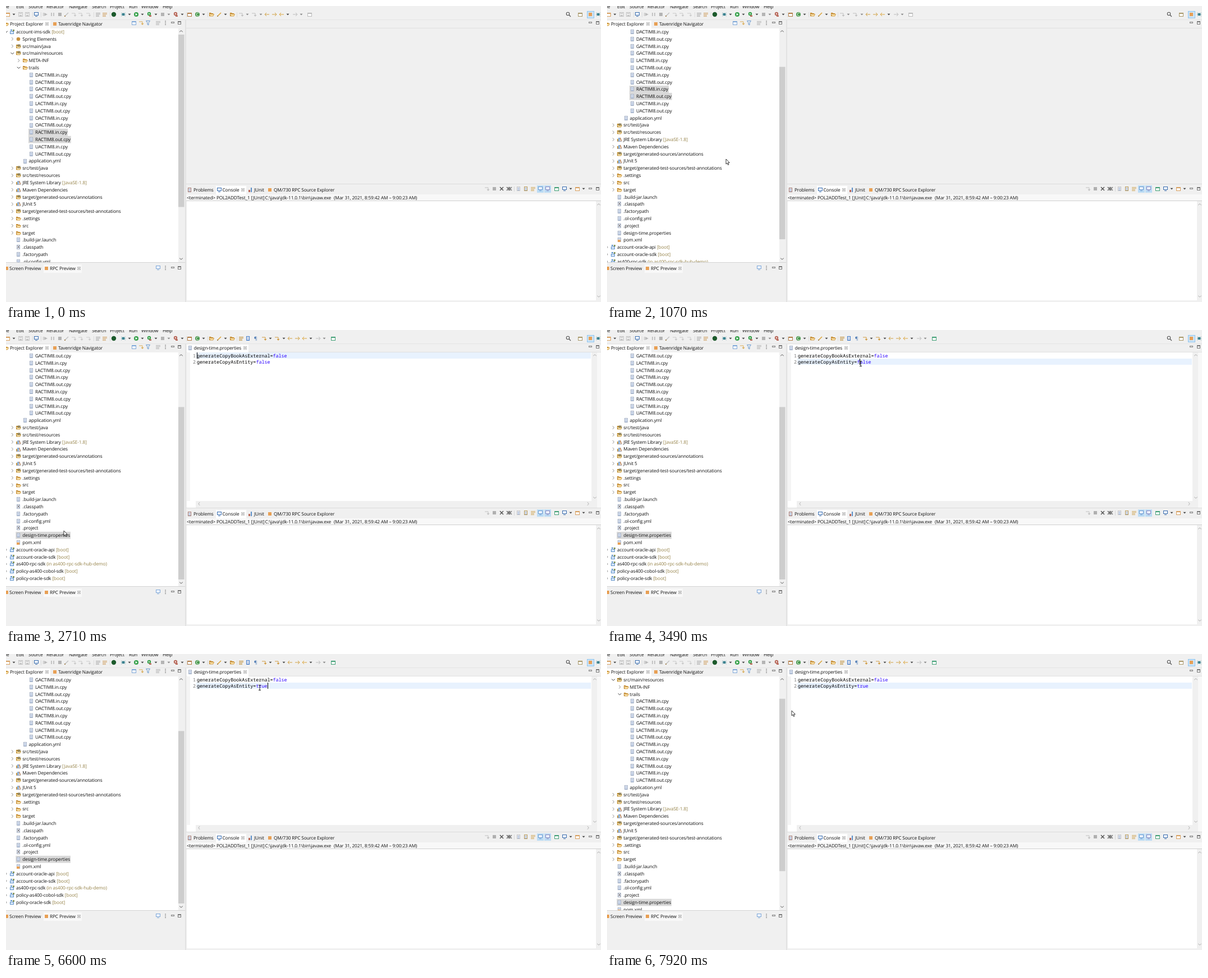
An HTML page with a canvas that plays this animation: 1060x528 px, repeating every 8 s.

```html
<!DOCTYPE html>
<html lang="en">
<head>
<meta charset="utf-8">
<title>IDE screencast</title>
<style>
html, body { margin: 0; width: 100%; height: 100%; overflow: hidden; background: #f0f0f0 }
canvas { display: block }
</style>
</head>
<body>
<canvas width="1060" height="528"></canvas>
<script>
const g = document.querySelector('canvas').getContext('2d');
const UI = '8.25px "Open Sans", "Noto Sans", sans-serif';
const MONO = '8.37px "Noto Sans Mono", "DejaVu Sans Mono", monospace';
const LOOP = 8000, ROW = 12.81, CHAR = 5.02;
const ORANGE = '#e8a055', BLUE = '#5b8fc8';
g.textRendering = 'geometricPrecision';

// ---- drawing helpers ----
function rect(x, y, w, h, c) { g.fillStyle = c; g.fillRect(x, y, w, h); }

function frame(x, y, w, h, c) {
  g.strokeStyle = c; g.lineWidth = 1;
  g.strokeRect(x + .5, y + .5, w - 1, h - 1);
}

function line(c, width, ...p) {
  g.strokeStyle = c; g.lineWidth = width;
  g.beginPath();
  for (let i = 0; i < p.length; i += 2) g.lineTo(p[i], p[i + 1]);
  g.stroke();
}

function poly(c, ...p) {
  g.fillStyle = c;
  g.beginPath();
  for (let i = 0; i < p.length; i += 2) g.lineTo(p[i], p[i + 1]);
  g.fill();
}

function dot(x, y, r, c) {
  g.fillStyle = c;
  g.beginPath(); g.arc(x, y, r, 0, 7); g.fill();
}

function setFont(font) {
  g.font = font;
  g.letterSpacing = font === UI ? '-0.12px' : '0px';
}

// y is the middle of the capitals; returns the right end
function text(s, x, y, c = '#111', font = UI) {
  setFont(font);
  g.fillStyle = c;
  g.fillText(s, x, y + 2.9);
  return x + g.measureText(s).width;
}

function chevron(x, y, dx, dy, c = '#606060') {
  line(c, 1, x - dx - dy * 2.4, y - dy - dx * 2.4, x + dx, y + dy, x - dx + dy * 2.4, y - dy + dx * 2.4);
}

// ---- icons, centred on x, y ----
const icons = {
  s(x, y, c) { rect(x - 3, y - 3, 6, 6, c); },
  o(x, y, c) { rect(x - 4, y - 3, 8, 7, '#fcfcfc'); frame(x - 4, y - 3, 8, 7, c); rect(x - 4, y - 3, 8, 2, c); },
  t(x, y, c) { rect(x - 4, y - 4, 8, 6, '#eef4ff'); frame(x - 4, y - 4, 8, 6, c); rect(x - 2, y + 3, 4, 1, c); },
  w(x, y, c) { frame(x - 4, y - 4, 8, 8, c); frame(x - 2, y - 4, 4, 3, c); rect(x - 2, y + 1, 4, 2, c); },
  d(x, y, c) {
    rect(x - 3, y - 4, 6, 8, '#fbfbff'); frame(x - 3, y - 4, 6, 8, c);
    for (let i = 0; i < 3; i++) rect(x - 1.5, y - 2 + 2 * i, 3, .8, '#6f8fc0');
  },
  f(x, y, c) {
    rect(x - 4, y - 3, 3.5, 2, c); frame(x - 4, y - 2, 7, 5, c);
    poly('#fbe3a8', x - 3, y + 3, x - 1.5, y - .5, x + 4.5, y - .5, x + 3, y + 3);
    line(c, .8, x - 3.5, y + 3, x - 1.5, y - .5, x + 4.5, y - .5, x + 3, y + 3, x - 3.5, y + 3);
  },
  g(x, y, c) { icons.f(x, y, '#b98a2c'); rect(x - 1, y - 3.5, 4.5, 4, c); line('#fff', .6, x + 1.2, y - 3.5, x + 1.2, y + .5); },
  j(x, y, c) { rect(x - 4, y - 1, 7, 5, '#dbe9fa'); frame(x - 4, y - 1, 7, 5, c); rect(x - 3, y - 4, 3, 2, c); rect(x + 1, y - 4, 3, 3, '#8a9a62'); },
  y(x, y) {
    rect(x - 4, y - 1, 2, 4, '#c89a48'); rect(x - 1.5, y - 3, 2, 6, BLUE);
    line('#b07a50', 1.5, x + 1.5, y - 3, x + 3.5, y + 3); rect(x - 4, y + 3, 8, .8, '#8a8a9a');
  },
  c(x, y, c) { dot(x, y, 4, c); poly('#fff', x - 1.3, y - 2.2, x + 2.3, y, x - 1.3, y + 2.2); },
  e(x, y, c) { dot(x, y - 1, 3.2, c); poly('#fff', x - 1, y - 2.5, x + 1.6, y - 1, x - 1, y + .6); rect(x, y + 1.5, 4, 2.5, '#b8685a'); },
  b(x, y, c) { dot(x, y, 2.4, c); line(c, .7, x - 3.5, y - 3, x + 3.5, y + 3); line(c, .7, x - 3.5, y + 3, x + 3.5, y - 3); line(c, .7, x - 4, y, x + 4, y); },
  h(x, y, c) { dot(x, y, 4.2, c); },
  q(x, y, c) { rect(x - 3, y - 3, 6, 6, c); },
  a(x, y, c) { line(c, 1, x + 4, y, x - 3, y); line(c, 1, x - 1, y - 3, x - 4, y, x - 1, y + 3); },
  r(x, y, c) { line(c, 1, x - 4, y, x + 3, y); line(c, 1, x + 1, y - 3, x + 4, y, x + 1, y + 3); },
  z(x, y, c) { line(c, 1, x - 4, y - 2, x + 2, y - 2, x + 2, y + 2); poly(c, x - .5, y + 1, x + 4.5, y + 1, x + 2, y + 4); },
  l(x, y, c) { for (let i = -3; i < 4; i += 2) rect(x - 4, y + i, 8 - (i > 0 ? 2 : 0), .9, c); },
  p(x, y, c) { rect(x - 3, y - 3, 2, 6, c); rect(x + 1, y - 3, 2, 6, c); },
  i(x, y, c) { rect(x - 4, y - 3, 1, 6, c); poly(c, x - 2, y - 3, x + 4, y, x - 2, y + 3); },
  n(x, y, c) { line(c, 1.6, x - 3, y + 3, x + 3, y - 3); rect(x - 4, y + 2, 2, 2, '#a98a5a'); },
  x(x, y, c) { line(c, 1.5, x - 3, y - 3, x + 3, y + 3); line(c, 1.5, x - 3, y + 3, x + 3, y - 3); },
  k(x, y) { for (let i = -3; i < 4; i += 3) rect(x - .7, y + i - .5, 1.5, 1.5, '#777'); },
  m(x, y) { frame(x - 3, y - 2, 6, 3, '#888'); },
  M(x, y) { frame(x - 3, y - 3, 6, 6, '#777'); rect(x - 3, y - 3, 6, 2, '#777'); },
  F(x, y, c) { line(c, 1, x - 3.5, y - 3.5, x + 3.5, y - 3.5, x + 1, y, x + 1, y + 4, x - 1, y + 3, x - 1, y, x - 3.5, y - 3.5); },
  S(x, y, c) { g.strokeStyle = c; g.lineWidth = 1.1; g.beginPath(); g.arc(x - 1, y - 1, 2.7, 0, 7); g.stroke(); line(c, 1.3, x + 1, y + 1, x + 4, y + 4); },
  v(x, y, c) { poly(c, x - 2.5, y - 1.2, x + 2.5, y - 1.2, x, y + 1.6); },
  P(x, y, c) { text('¶', x - 2, y, c); },
  G(x, y, c) { dot(x, y, 4, c); text('C', x - 2.5, y, '#fff'); },
  T(x, y) { line('#909090', .8, x - 2, y - 2, x + 2, y + 2); line('#909090', .8, x - 2, y + 2, x + 2, y - 2); frame(x - 3, y - 3, 6, 6, '#c8c8c8'); }
};

// specs look like "26w#bbb": position, icon, colour
function strip(spec, y, dx = 0) {
  for (const [, x, kind, c = '#444'] of spec.matchAll(/(\d+)(\w)(#\w+)?/g)) icons[kind](+x + dx, y, c);
}

const BAR = '3o#d8a060 14v 54t#3d6fae 70i#bbb 83p#c4c4c4 96q#b4b4b4 108n#c4c4c4 121z#c8c8c8 133z#c8c8c8 147z#ccc ' +
  '164l#aaa 176l#d0a060 192h#1c5a2c 209b#3c8290 220v 232c#35a04a 243v 255e#35a04a 267v 279q#b4b4b4 290v#888 ' +
  '302e#b8685a 314v 327o#b07a44 341G#4b9a50 352v 366f#c48a2c 380n#dca53c 391v 403f#c48a2c';
const HISTORY = '465a#d0a040 478r#d0a040 491a#dca53c 502v 515r#bbb 526v#888';

// ---- project tree: level, open/closed mark, icon, label, decoration ----
const tree = [
  '0vj|account-ims-sdk|[boot]', '1>L|Spring Elements', '1>g|src/main/java', '1vg|src/main/resources',
  '2>f|META-INF', '2vf|trails',
  ...[...'DGLORU'].flatMap(c => ['in', 'out'].map(k => `3 d|${c}ACTIM8.${k}.cpy`)),
  '2 d|application.yml', '1>g|src/test/java', '1>g|src/test/resources', '1>y|JRE System Library|[JavaSE-1.8]',
  '1>y|Maven Dependencies', '1>g|target/generated-sources/annotations', '1>y|JUnit 5',
  '1>g|target/generated-test-sources/test-annotations', '1>f|.settings', '1>f|src', '1>f|target',
  '1 d|.build-jar.launch', '1 X|.classpath', '1 d|.factorypath', '1 d|.ol-config.yml', '1 X|.project',
  '1 d|design-time.properties', '1 O|pom.xml', '0>j|account-oracle-api|[boot]', '0>j|account-oracle-sdk|[boot]',
  '0>j|as400-rpc-sdk|(in as400-rpc-sdk-hub-demo)', '0>j|policy-as400-cobol-sdk|[boot]', '0>j|policy-oracle-sdk|[boot]'
];
const PROPS = tree.findIndex(s => s.includes('design-time'));
const rowColors = { j: BLUE, g: '#7a6a3a', f: '#c48a2c', d: '#a4b0c4' };

function treeIcon(kind, x, y) {
  if (kind === 'L') return dot(x, y, 3.3, '#c9923e');
  if (kind === 'X') {
    rect(x - 3, y - 4, 6, 8, '#fff'); frame(x - 3, y - 4, 6, 8, rowColors.d);
    return text('x', x - 2, y - .6, '#223');
  }
  if (kind === 'O') { icons.d(x, y, rowColors.d); return rect(x - 3, y, 5, 4, ORANGE); }
  icons[kind](x, y, rowColors[kind]);
}

// ---- timeline ----
const path = [
  [70, 980, 515], [760, 212, 273], [1390, 212, 273], [1700, 71, 364], [2640, 71, 364], [2710, 103, 358],
  [3090, 449, 66], [3180, 449, 63], [3400, 449, 63], [3490, 452, 60], [6760, 452, 60], [7080, 257, 100],
  [7700, 257, 100], [7920, 329, 101]
];
const OPEN = 2320, blinks = [OPEN, 2860, 3490, 4200, 4430, 5670, 6090, 6690, 7240, 7700];
const scrolls = [[0, 0], [830, 3], [1070, 6], [1140, 9], [7160, 6], [7240, 3]];
const values = [[0, 'false'], [4430, 't'], [4660, 'tr'], [4990, 'tru'], [5130, 'true']];
const at = (list, t) => list.findLast(e => e[0] <= t)[1];

function pointer(t) {
  if (t < path[0][0]) return null;
  const i = path.findLastIndex(p => p[0] <= t), [a, x, y] = path[i];
  if (i === path.length - 1) return [x, y];
  const [b, u, v] = path[i + 1], n = Math.max(1, Math.round((b - a) / 75));
  const f = Math.floor((t - a) / (b - a) * n) / n;
  return [x + (u - x) * f, y + (v - y) * f];
}

function drawTree(t, mouse) {
  const top = at(scrolls, t);
  rect(0, 40, 318, 417, '#fff');
  g.save();
  g.beginPath(); g.rect(0, 40, 307, 417); g.clip();
  for (let i = top; i < top + 33 && i < tree.length; i++) {
    const [head, label, extra] = tree[i].split('|'), level = +head[0];
    const y = 46 + (i - top) * ROW, iconY = Math.round(y), x = 18 + level * 11.3;
    setFont(UI);
    const end = x + g.measureText(label).width + 1;
    const chosen = t < 2010 ? i === 14 || i === 15 : i === PROPS;
    const hover = mouse && mouse[0] > x - 12 && mouse[0] < end && Math.abs(mouse[1] - y) < ROW / 2;
    if (chosen || hover) rect(x - 12, y - 6.4, end - x + 12, ROW, chosen ? '#d9d9d9' : '#e5f3ff');
    if (head[1] === '>') chevron(x - 18, y, 1.2, 0, '#909090');
    if (head[1] === 'v') chevron(x - 18, y, 0, 1.2, '#404040');
    treeIcon(head[2], Math.round(x - 7), iconY);
    const right = text(label, x, y);
    if (extra) text(extra, right + 2.2, y, '#958248');
  }
  g.restore();
  rect(307, 40, 11, 417, '#f0f0f0');
  const over = mouse && mouse[0] >= 307 && mouse[0] < 318;
  rect(307, 51 + top * 9.6, 10.5, 307.5, over ? '#a6a6a6' : '#cdcdcd');
  chevron(312, 45, 0, -1.2);
  chevron(312, 451, 0, 1.2);
}

function drawEditor(t) {
  const dirty = t >= 4430 && t < 6140, second = t >= 3490, value = at(values, t);
  rect(322, 26, dirty ? 114 : 110, 14, '#fff');
  icons.d(328, 32, rowColors.d);
  icons.T(Math.round(text((dirty ? '*' : '') + 'design-time.properties', 334.5, 32) + 7), 32);
  rect(322, 40, 738, 277, '#fff');
  rect(322, 40, 6, 265, '#f4f4f4');
  rect(1043, 40, 10, 265, '#f0f0f0');
  rect(1053, 40, 7, 277, '#f8f8f8');
  rect(338, 305, 715, 12, '#f0f0f0');
  chevron(1049, 45, 0, -1.2, '#b0b0b0');
  chevron(1049, 299, 0, 1.2, '#b0b0b0');
  chevron(344, 310, -1.2, 0, '#b0b0b0');
  chevron(1037, 310, 1.2, 0, '#b0b0b0');
  rect(339, second ? 51 : 40, 703, 11, '#e8f2fe');
  if (t >= 4430 && t < 6600) {
    rect(328, 51, 10.5, 11, '#e3cfe8');
    rect(1055, 55, 4, 3, '#d8c8dc');
  }
  const keys = ['generateCopyBookAsExternal=', 'generateCopyAsEntity='];
  keys.forEach((key, i) => {
    const y = 45.6 + i * 11.3, x = 340 + key.length * CHAR, picked = i && t >= 3580 && t < 4430;
    text(i + 1, 333, y, '#787878', MONO);
    text(key, 340, y, '#000', MONO);
    if (picked) rect(x, 51, 5 * CHAR, 11, '#0078d7');
    text(i ? value : 'false', x, y, picked ? '#fff' : '#2a00ff', MONO);
  });
  const column = second ? keys[1].length + (t < 3580 ? 1 : value.length) : 0;
  if (blinks.filter(b => b <= t).length % 2) rect(Math.round(340 + column * CHAR), second ? 51 : 40, 1, 11, '#000');
}

function drawBars(t) {
  const open = t >= OPEN, save = t >= 4430 && t < 6140 ? '#7a88c0' : '#c4c4c4';
  ['File', 'Edit', 'Source', 'Refactor', 'Navigate', 'Search', 'Project', 'Run', 'Window', 'Help']
    .forEach((s, i) => text(s, [-7, 18, 40, 72, 112, 153, 185, 219, 241, 279][i], .6));
  strip(BAR, 15);
  icons.w(26, 15, save);
  icons.w(38, 15, save);
  for (const x of [47, 62, 156, 185, 321, 359, 411]) rect(x, 11, 1, 9, '#dcdcdc');
  if (open) strip('419l#c09038 431d#3d78c8 444P#3d6fae 460z#d09a40 471v 483z#d09a40 495v 583o#43a077', 15);
  else strip('419z#c0c0c0 430v#888 442z#c0c0c0 454v#888 541o#bbb', 15);
  strip(HISTORY, 15, open ? 41 : 0);
  rect(1035, 9, 13, 13, '#cce4f7');
  frame(1035, 9, 13, 13, '#90c4ec');
  strip('1002S#555 1023o#a8986a 1041s#e8a055 1055b#3c8290', 15);
}

function drawPanels() {
  rect(0, 26, 79, 14, '#fff');
  text('Project Explorer', 7, 32);
  icons.f(0, 32, '#c48a2c');
  icons.T(73, 32);
  icons.s(87, 32, ORANGE);
  text('Tavenridge Navigator', 93, 32);
  strip('228o#7fa8d8 241z#d8ac58 253F#6a9ad0 271l#b4b4b4 284k 297m 309M 1041m 1054M', 30);

  rect(0, 457, 319, 1, '#d4d4d4');
  rect(67, 461, 68, 15, '#f8f8f8');
  icons.s(1, 468, ORANGE);
  text('Screen Preview', 6, 468.5);
  icons.s(72, 468, ORANGE);
  text('RPC Preview', 78, 468.5);
  icons.T(130, 468);
  strip('271t#7fa8d8 284k 297m 309M', 467);

  rect(319, 25, 2, 503, '#e2e2e2');
  rect(321, 317, 739, 1, '#dcdcdc');
  rect(374, 321, 54, 15, '#fff');
  icons.d(327, 328, '#a87a70');
  text('Problems', 334, 328);
  icons.t(380, 328, '#3d6fae');
  text('Console', 385.5, 328);
  icons.T(422, 328);
  rect(432, 328, 3, 4, '#b8685a'); rect(436, 324, 2, 8, BLUE);
  text('JUnit', 442, 328);
  icons.s(470, 328, ORANGE);
  text('QM/730 RPC Source Explorer', 477, 328);
  rect(946, 320, 12, 13, '#bcdcf4');
  rect(959, 320, 12, 13, '#bcdcf4');
  strip('857z#c0c0c0 870q#b0b0b0 883x#555 895x#666 898x#777 913d#c4c4c4 926d#b89a58 939l#d0a858 952t#6a9ad0 ' +
    '965t#8a88c0 981o#43a077 995t#3d6fae 1006v 1018o#d8a060 1029v 1041m 1054M', 326);
  rect(905, 322, 1, 9, '#d8d8d8');

  rect(321, 336, 739, 11, '#f8f8f8');
  text('<terminated> POL2ADDTest_1 [JUnit]', 322, 342);
  text('C:\\java\\jdk-11.0.1\\bin\\javaw.exe', 461.5, 342);
  text('(Mar 31, 2021, 8:59:42 AM – 9:00:23 AM)', 584, 342);
  rect(321, 347, 739, 1, '#d0d0d0');
  rect(322, 348, 729, 177, '#fff');
  chevron(1056, 354, 0, -1.2, '#b0b0b0');
  chevron(1056, 518, 0, 1.2, '#b0b0b0');
}

function drawPointer([x, y], t) {
  if (x > 338 && (y > 348 || t >= OPEN && y > 40 && y < 305)) {
    line('#222', 1, x - 2, y - 4.5, x + 2, y - 4.5);
    line('#222', 1, x, y - 4.5, x, y + 4.5);
    line('#222', 1, x - 2, y + 4.5, x + 2, y + 4.5);
    return;
  }
  const p = [0, 0, 0, 9, 2.1, 7.2, 3.5, 10.5, 5, 9.8, 3.6, 6.7, 6.3, 6.5, 0, 0].map((v, i) => v + (i % 2 ? y : x));
  poly('#fff', ...p);
  line('#222', .9, ...p);
}

function draw(t) {
  const mouse = pointer(t);
  rect(0, 0, 1060, 528, '#f0f0f0');
  rect(0, 24, 1060, 1, '#e4e4e4');
  drawBars(t);
  drawPanels();
  rect(321, 39, 739, 1, '#e0e0e0');
  drawTree(t, mouse);
  if (t >= OPEN) drawEditor(t);
  if (mouse) drawPointer(mouse, t);
}

const start = performance.now();
(function tick() {
  draw((performance.now() - start) % LOOP);
  requestAnimationFrame(tick);
})();
</script>
</body>
</html>
```
